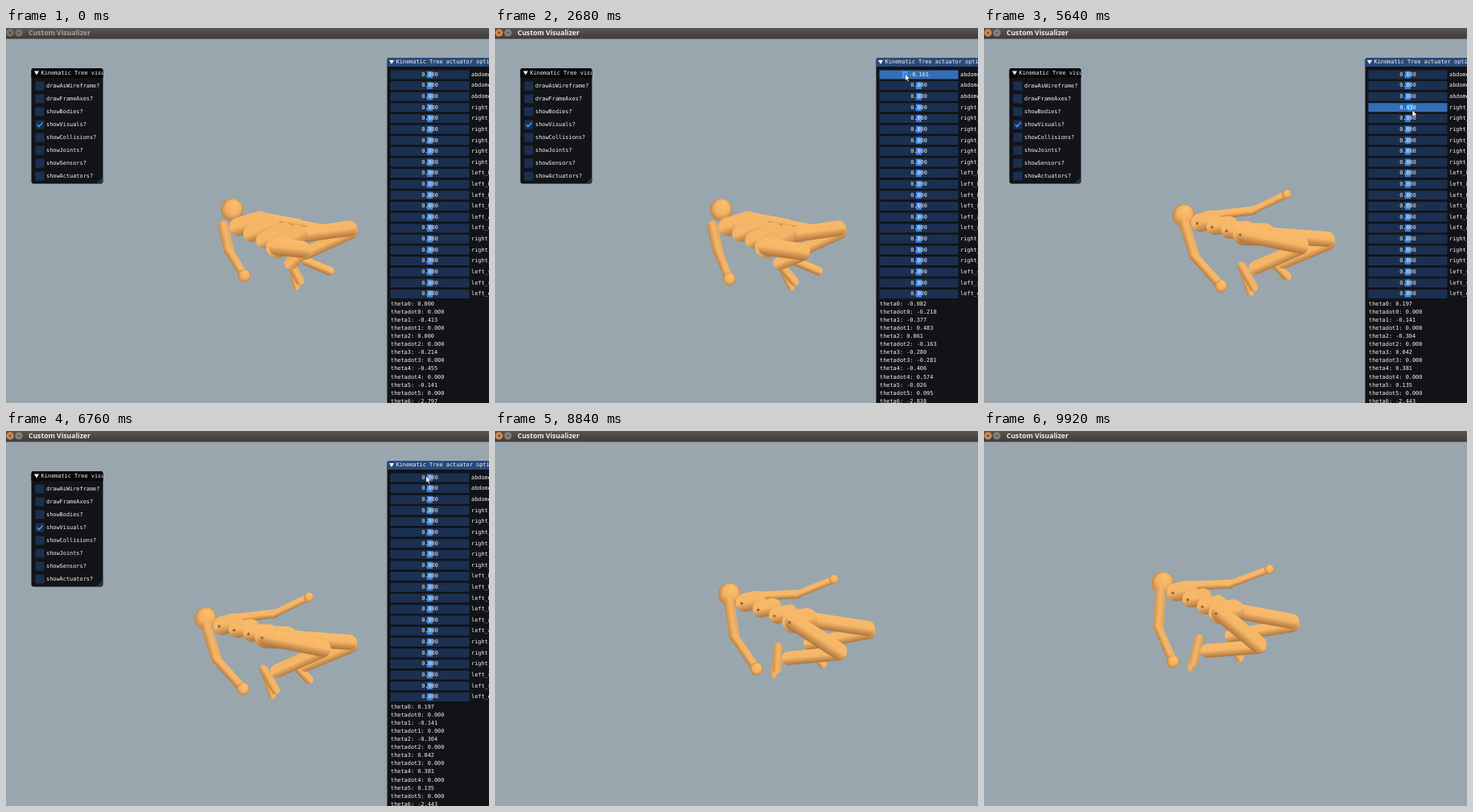
Write an HTML page with a canvas that moves like this. It is 600 px wide and 466 px high and loops after 9960 ms.

```html
<!DOCTYPE html>
<html lang="en">
<head>
<meta charset="utf-8">
<style>
html, body { margin: 0; height: 100%; overflow: hidden; background: #99a6ae; }
canvas { display: block; }
</style>
</head>
<body>
<canvas id="stage" width="600" height="466"></canvas>
<script>
const ctx = document.getElementById('stage').getContext('2d');
const LOOP = 9960, FOCUS = 1200, HIDE = 7400, ORBIT = 8000;
const MONO = '6.9px "DejaVu Sans Mono", monospace';
const FRAME = '#1b3050', GRAB = '#3d85e0', ACTIVE = '#336fb8';

const clamp = u => Math.max(0, Math.min(1, u));
const smooth = u => u * u * (3 - 2 * u);
const mix = (a, b, u) => a.map((v, i) => v + (b[i] - v) * u);
const add = ([x, y], dx, dy) => [x + dx, y + dy];
const mapPose = (pose, f) => Object.fromEntries(Object.entries(pose).map(([k, p]) => [k, f(p, k)]));
const mixPose = (a, b, u) => mapPose(a, (p, k) => mix(p, b[k], u));

// Move the figure and turn it around its head, as the camera would
function view(pose, dx, dy, shear, tilt) {
  const [hx, hy] = pose.head;
  return mapPose(pose, ([x, y]) => {
    const u = x - hx, v = y - hy;
    return [hx + dx + u * (1 + .12 * shear) + v * shear, hy + dy + u * tilt + v * (1 - .2 * shear)];
  });
}

// Two full poses; the others follow from them
const rest = {
  head: [281, 226], chestA: [289, 247], chestB: [315, 239], hipA: [337, 272], hipB: [361, 258],
  shoulder: [270, 246], elbow: [277, 277], hand: [296, 308], farElbow: [364, 243], farHand: [400, 250],
  knee: [367, 275], ankle: [354, 292], heel: [355, 295], toe: [365, 314],
  farKnee: [427, 249], farAnkle: [372, 280], farHeel: [373, 290], farToe: [402, 302]
};
const curl = {
  head: [232, 256], chestA: [252, 265], chestB: [266, 261], hipA: [314, 284], hipB: [330, 280],
  shoulder: [232, 265], elbow: [242, 308], hand: [272, 345], farElbow: [317, 250], farHand: [361, 229],
  knee: [373, 316], ankle: [311, 329], heel: [297, 316], toe: [298, 343],
  farKnee: [407, 286], farAnkle: [336, 309], farHeel: [338, 314], farToe: [354, 333]
};
const bend = { ...rest, knee: [381, 278], hand: [291, 312], toe: [372, 315] };
const reach = { ...view(curl, 16, -23, .07, 0), hipA: [323, 256], knee: [393, 270],
  ankle: [337, 298], heel: [320, 296], toe: [335, 322], farAnkle: [372, 291] };
const twist = { ...view(mixPose(rest, reach, .5), 15, -3, 0, 0), elbow: [268, 275], hand: [278, 314],
  farHand: [416, 238], knee: [429, 273], ankle: [367, 284], heel: [347, 288], toe: [379, 309] };

const poseKeys = [[0, rest], [2100, rest], [2680, bend], [3300, rest], [4360, twist],
  [5000, reach], [7000, reach], [ORBIT, curl], [LOOP, curl]];
// x, y, shear, tilt
const cameraKeys = [[ORBIT, [0, 0, 0, 0]], [8840, [59, -53, -.07, .07]], [9920, [-10, -67, -.29, .09]]];

// Slider drags, one row each: start and end time
const drags = [[2287, 3300], [3450, 4050], [4195, 5195], [5624, 6500]];
const cursorKeys = [[FOCUS, [300, 397]],
  ...drags.flatMap((span, row) => span.map(t => [t, [526.5, 57 + 15 * row]])),
  [6900, [520, 38]]];

const restAngles = [0, -.413, 0, -.214, -.455, -.141, -2.797];
const endAngles = [.197, -.141, -.304, .042, .381, .135, -2.443];

// Segment of a key list at time t: its ends and the progress between them
function segment(keys, t) {
  let i = 1;
  while (i < keys.length - 1 && keys[i][0] <= t) i++;
  const [t0, a] = keys[i - 1], [t1, b] = keys[i];
  return { a, b, i, u: clamp((t - t0) / (t1 - t0)) };
}

function rect(x, y, w, h, color, radii = 0) {
  ctx.fillStyle = color;
  ctx.beginPath();
  ctx.roundRect(x, y, w, h, radii);
  ctx.fill();
}

function text(str, x, y, color = '#f4f4f4', font = MONO, align = 'left') {
  ctx.font = font;
  ctx.textAlign = align;
  ctx.textBaseline = 'middle';
  ctx.fillStyle = color;
  ctx.fillText(str, x, y);
}

function polygon(points, color) {
  ctx.fillStyle = color;
  ctx.beginPath();
  points.forEach(p => ctx.lineTo(...p));
  ctx.fill();
}

function line(points, color, width) {
  ctx.strokeStyle = color;
  ctx.lineWidth = width;
  ctx.beginPath();
  points.forEach(p => ctx.lineTo(...p));
  ctx.stroke();
}

function disc(x, y, r, color) {
  ctx.fillStyle = color;
  ctx.beginPath();
  ctx.arc(x, y, r, 0, 7);
  ctx.fill();
}

const skin = light => `rgb(${mix([168, 112, 58], [254, 190, 108], clamp(light)).map(Math.round)})`;

function ball([x, y], r) {
  const g = ctx.createRadialGradient(x + r * .25, y - r * .6, r * .1, x, y, r * 1.05);
  g.addColorStop(0, skin(1));
  g.addColorStop(.6, skin(.82));
  g.addColorStop(1, skin(.2));
  disc(x, y, r, g);
}

// Capsule lit from above, shaded across its width
function limb(a, b, r) {
  const dx = b[0] - a[0], dy = b[1] - a[1], len = Math.hypot(dx, dy) || 1;
  const nx = dy / len, ny = -dx / len, side = nx * .25 - ny;
  const g = ctx.createLinearGradient(a[0] + nx * r, a[1] + ny * r, a[0] - nx * r, a[1] - ny * r);
  g.addColorStop(0, skin(.55 + .4 * side));
  g.addColorStop(.5, skin(.9));
  g.addColorStop(1, skin(.55 - .5 * side));
  ctx.lineCap = 'round';
  line([a, b], g, r * 2);
  ctx.lineCap = 'butt';
}

function figureAt(t) {
  const { a, b, u } = segment(poseKeys, t);
  const pose = mixPose(a, b, smooth(u));
  if (t < ORBIT) return pose;
  const cam = segment(cameraKeys, t), [x, y, shear, tilt] = mix(cam.a, cam.b, smooth(cam.u));
  const swing = Math.sin(2 * Math.PI * cam.u) * (cam.i === 1 ? -60 : 60);
  return view(pose, x + swing, y - swing * .6, shear, tilt);
}

function drawFigure(t) {
  const p = figureAt(t);
  limb(add(p.chestB, 0, -5), p.farElbow, 5.5);
  limb(p.farElbow, p.farHand, 4.5);
  ball(p.farHand, 6);
  limb(p.farHeel, p.farToe, 5.5);
  limb(p.farAnkle, add(p.farKnee, 2, 5), 8);
  limb(p.hipB, p.farKnee, 9.5);
  limb(p.heel, add(p.toe, -4, 7), 4.5);
  limb(p.heel, p.toe, 5.5);
  ball(p.head, 14);

  const dots = [];
  [11.5, 10.5, 10.5, 14].forEach((r, i) => {
    const a = mix(p.chestA, p.hipA, i / 3);
    limb(a, mix(p.chestB, p.hipB, i / 3), r);
    dots.push(add(a, -r * .35, 1));
  });
  limb(p.shoulder, p.elbow, 6.5);
  limb(p.elbow, p.hand, 5.5);
  ball(p.hand, 8);
  limb(p.ankle, add(p.knee, 1, 3), 8.5);
  limb(p.hipA, p.knee, 10.5);
  if (t > 4000) dots.forEach(([x, y]) => disc(x, y, 1.8, '#99683a'));
}

function drawTitleBar(focused) {
  const g = ctx.createLinearGradient(0, 0, 0, 14);
  g.addColorStop(0, '#595550');
  g.addColorStop(1, '#3e3a38');
  rect(0, 0, 600, 13.6, g);
  disc(5, 6, 4.7, focused ? '#d08a50' : '#77736b');
  disc(16, 6, 4.7, focused ? '#85817a' : '#77736b');
  line([[3.5, 4.5], [6.5, 7.5]], '#4a3a2d', .9);
  line([[6.5, 4.5], [3.5, 7.5]], '#4a3a2d', .9);
  line([[14, 6], [18, 6]], '#45423d', .9);
  text('Custom Visualizer', 28, 6.5, focused ? '#f0eee8' : '#a5a198', 'bold 8.6px "Open Sans", sans-serif');
}

function panelTitle(x, y, str) {
  polygon([[x, y - 2.5], [x + 6, y - 2.5], [x + 3, y + 2.5]], '#fff');
  text(str, x + 8.5, y);
}

function drawOptions() {
  ctx.save();
  ctx.beginPath();
  ctx.roundRect(31.5, 50, 89, 143.5, 3);
  ctx.clip();
  rect(31, 50, 90, 144, '#131418');
  rect(31, 50, 90, 12, '#08080a');
  panelTitle(35, 56, 'Kinematic Tree visuals');
  ['drawAsWireframe', 'drawFrameAxes', 'showBodies', 'showVisuals', 'showCollisions',
    'showJoints', 'showSensors', 'showActuators'].forEach((name, i) => {
    const y = 72 + 16 * i;
    rect(36.5, y - 5.5, 11, 11, FRAME);
    text(name + '?', 50, y);
    if (name === 'showVisuals') line([[39, y], [41, y + 2.5], [45.5, y - 2.5]], '#4296fa', 1.5);
  });
  polygon([[120.5, 185], [120.5, 193.5], [112, 193.5]], '#22344f');
  ctx.restore();
}

const rowLabels = ['abdomen_z', 'abdomen_y', 'abdomen_x'];
for (const parts of [['hip_x', 'hip_z', 'hip_y', 'knee', 'ankle_x', 'ankle_y'], ['shoulder1', 'shoulder2', 'elbow']])
  for (const side of ['right', 'left'])
    for (const part of parts) rowLabels.push(`${side}_${part}`);

// One swing to each side per drag; the first starts to the left
function dragValue(row, t) {
  const [from, to] = drags[row];
  return (row ? .25 : -.25) * Math.sin(2 * Math.PI * (t - from) / (to - from));
}

// Joints drift to their end angles while they sway
function angle(i, t) {
  const u = clamp((t - 2100) / 3500);
  const sway = .2 * Math.sin(Math.PI * u) * Math.sin(t / 250 + i * 2);
  return restAngles[i] + (endAngles[i] - restAngles[i]) * smooth(u) + sway;
}

function drawActuators(t, activeRow) {
  rect(473.5, 37, 127, 430, '#121317', [3, 0, 0, 0]);
  rect(473.5, 37, 127, 11, '#294a7a', [3, 0, 0, 0]);
  panelTitle(476, 42.5, 'Kinematic Tree actuator options');
  rowLabels.forEach((label, i) => {
    const y = 58 + 13.62 * i, active = i === activeRow;
    const value = active ? dragValue(i, t) : 0;
    rect(477.5, y - 5.5, 98, 11, active ? ACTIVE : FRAME);
    rect(523 + value * 107, y - 4.3, 7, 8.6, active ? '#4296fa' : GRAB);
    text(value.toFixed(3), 526.5, y, '#f4f4f4', MONO, 'center');
    text(label, 578, y);
  });
  restAngles.forEach((_, i) => {
    const y = 343 + 20.16 * i, rate = (angle(i, t + 5) - angle(i, t - 5)) * 100;
    text(`theta${i}: ${angle(i, t).toFixed(3)}`, 478, y);
    text(`thetadot${i}: ${rate.toFixed(3)}`, 478, y + 10.08);
  });
}

function drawCursor(t, row) {
  const { a, b, u } = segment(cursorKeys, t);
  let [x, y] = mix(a, b, smooth(u));
  if (row >= 0) x += 115 * dragValue(row, t + 10);
  const shape = [[0, 0], [0, 8.5], [2, 6.8], [3.4, 9.8], [4.9, 9.1], [3.5, 6.2], [6, 6]]
    .map(q => add(q, x, y));
  polygon(shape, '#fff');
  line([...shape, shape[0]], '#111', .6);
}

function draw(t) {
  rect(0, 0, 600, 466, '#99a6ae');
  drawFigure(t);
  if (t < HIDE) {
    const row = drags.findIndex(([from, to]) => t >= from && t < to);
    drawOptions();
    drawActuators(t, row);
    if (t > FOCUS) drawCursor(t, row);
  }
  drawTitleBar(t > FOCUS);
}

const start = performance.now();
function tick() {
  draw((performance.now() - start) % LOOP);
  requestAnimationFrame(tick);
}
tick();
</script>
</body>
</html>
```
